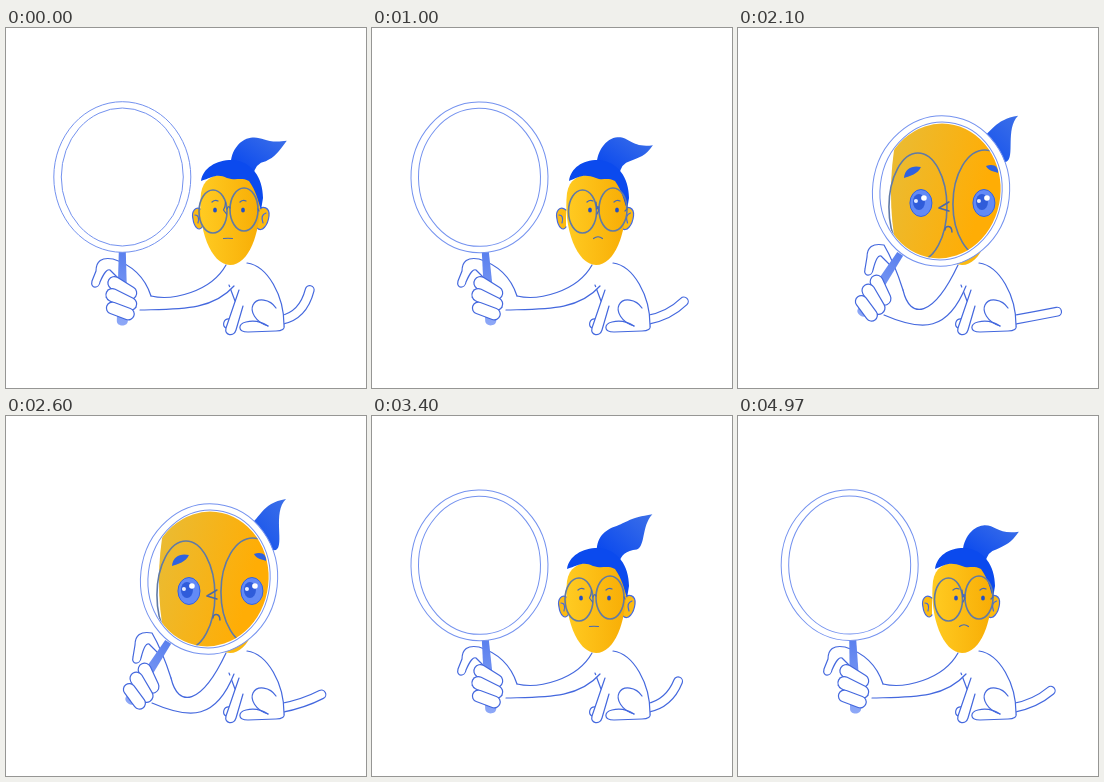
An HTML page that plays this animation: 360 by 360 pixels, repeating every 5 s.

```html
<!DOCTYPE html>
<html lang="en">
<head>
<meta charset="utf-8">
<title>Magnifying glass</title>
<style>
  html, body { margin: 0; width: 100%; height: 100%; overflow: hidden; background: #fff; }
  svg { display: block; width: 100vw; height: 100vh; }
  .ink { fill: none; stroke: #4468de; stroke-width: 1.2; stroke-linecap: round; stroke-linejoin: round; }
  .white { fill: #fff; }
  .ring { stroke: #7492ef; stroke-width: 1; }
  .specs { fill: none; stroke: #617aa5; stroke-width: 1.6; }
  .edge { stroke: #4468de; fill: none; stroke-linecap: round; }
  .core { stroke: #fff; fill: none; stroke-linecap: round; }
</style>
</head>
<body>
<svg viewBox="0 0 360 360">
  <defs>
    <linearGradient id="skin"><stop offset="0" stop-color="#ffcb22"/><stop offset="1" stop-color="#f8ad05"/></linearGradient>
    <linearGradient id="zoomSkin" x2=".9" y2=".5"><stop offset=".1" stop-color="#e8bd38"/><stop offset=".8" stop-color="#ffad05"/></linearGradient>
    <linearGradient id="hair" x1="0" y1="1" x2="1" y2="0"><stop offset=".15" stop-color="#0a49ee"/><stop offset="1" stop-color="#3d70e8"/></linearGradient>
    <linearGradient id="grip" x1="0" y1="0" x2="0" y2="1"><stop offset="0" stop-color="#5a80ee"/><stop offset="1" stop-color="#8ea8f7"/></linearGradient>
    <clipPath id="pane"><ellipse cx="-.5" rx="60" ry="67.5"/></clipPath>
    <g id="bigEye">
      <ellipse rx="11" ry="13.5" fill="#628af6" stroke="#3463df"/>
      <ellipse cx="-2" cy="-1" rx="6" ry="8" fill="#2f5cda"/>
      <circle cx="3" cy="-5" r="2.8" fill="#fff"/>
      <circle cx="-5" cy="-2" r="2" fill="#e6edff"/>
    </g>
  </defs>

  <path class="edge tail" stroke-width="10"/>
  <path class="core tail" stroke-width="7.6"/>

  <path class="white" d="M219 236L222 262 236 300 277 302C281 290 276 262 262 246 254 237 247 236 240 235Z"/>
  <g class="ink">
    <path d="M241 235C262 238 278 268 278 297 279 301 276 303 270 303L242 304C231 304 232 296 240 294 248 292 256 294 262 298"/>
    <path d="M262 298C249 294 244 283 247 277 251 269 264 271 270 280"/>
    <path class="white" d="M224 291C217 290 216 298 220 300"/>
    <path class="white" d="M233 262L220 300C218 308 228 309 230 302L237 278"/>
    <path d="M223 257L229 273"/>
  </g>
  <path id="arm" class="ink" style="fill:#fff"/>

  <path id="pony" fill="url(#hair)"/>
  <g id="earL" class="ink">
    <path fill="#fcbb12" d="M196 182C190 177 185 183 187 191 188 199 193 204 196 199"/>
    <path d="M189 187Q194 187 192 195"/>
  </g>
  <g id="earR" class="ink">
    <path fill="#fcbb12" d="M251 183C257 176 264 180 263 188 262 197 256 205 251 200"/>
    <path d="M260 185Q254 187 257 195"/>
  </g>
  <path fill="url(#skin)" d="M195 165C191 200 205 237 224 237 243 237 254 205 254 175 254 150 240 146 222 146 206 146 197 152 195 165Z"/>
  <path id="cap" fill="#0b4aee"/>
  <ellipse id="lensL" class="specs" cy="183.5" rx="14" ry="21.5"/>
  <ellipse id="lensR" class="specs" cy="181.5" rx="14" ry="21.5"/>
  <ellipse id="eyeL" cy="182" rx="1.9" ry="2.6" fill="#2450c4"/>
  <ellipse id="eyeR" cy="182" rx="1.9" ry="2.6" fill="#2450c4"/>
  <path id="lines" class="ink" style="stroke:#4668b4"/>

  <path id="palm" class="ink" style="fill:#fff"/>
  <path id="handle" fill="url(#grip)" d="M-3.5-38H3.5L5.5 31C5.5 37-5.5 37-5.5 31Z"/>
  <g id="lens">
    <ellipse class="ring white" rx="68.5" ry="75.3"/>
    <g clip-path="url(#pane)">
      <g id="zoom">
        <ellipse cx="20" cy="2" rx="70" ry="145" fill="url(#zoomSkin)"/>
        <ellipse class="specs" cx="-23" cy="16" rx="29" ry="54"/>
        <ellipse class="specs" cx="44" cy="13" rx="32" ry="54"/>
        <path fill="#2f62e0" d="M-37-13C-36-23-28-26-20-24-23-17-31-15-37-13ZM45-25C53-28 58-24 57-18 52-20 48-20 45-25Z"/>
        <use href="#bigEye" x="-20" y="12"/>
        <use href="#bigEye" x="43" y="12"/>
        <path class="ink" style="stroke:#4c68a8;stroke-width:1.5" d="M8 11L-2 17 8 20M4 39C4 34 11 34 11 41"/>
      </g>
    </g>
    <ellipse class="ring" fill="none" rx="61" ry="69"/>
  </g>
  <g id="fingers">
    <path class="edge" stroke-width="14" d="M108 255L124 265"/><path class="core" stroke-width="11.6" d="M108 255L124 265"/>
    <path class="edge" stroke-width="14" d="M106 267L124 276"/><path class="core" stroke-width="11.6" d="M106 267L124 276"/>
    <path class="edge" stroke-width="13" d="M106 280L122 286"/><path class="core" stroke-width="10.6" d="M106 280L122 286"/>
  </g>
</svg>
<script>
const LOOP = 5000, CYCLE = 3900;
const $ = id => document.getElementById(id);
const set = (el, attrs) => { for (const k in attrs) el.setAttribute(k, attrs[k]); };
const mix = (a, b, p) => a + (b - a) * p;
const between = (a, b, p) => a.map((v, i) => mix(v, b[i], p));
const shift = ([x, y], dx, dy) => [x + dx, y + dy];

// Progress from a to b, clamped; ease runs 0 to 1, hump 0 to 1 and back.
const progress = (t, a, b) => Math.min(1, Math.max(0, (t - a) / (b - a)));
const ease = (t, a, b) => (1 - Math.cos(Math.PI * progress(t, a, b))) / 2;
const hump = (t, a, b) => Math.sin(Math.PI * progress(t, a, b)) ** 2;
const wave = t => Math.cos(t / CYCLE * 2 * Math.PI);

function drawTail(t) {
  const w = wave(t);
  const d = `M275 292Q297 288 ${311.5 - 7.8 * w} ${273 - 11 * w}`;
  document.querySelectorAll('.tail').forEach(el => set(el, { d }));
}

function drawPonytail(t) {
  const lift = (1 - wave(t - 600)) / 2;
  const at = (low, high) => between(low, high, lift);
  const crown = at([246, 109], [240, 112]), tip = at([281, 121], [280, 83]);
  const out = at([258, 109], [254, 104]), dip = at([260, 124], [255, 87]);
  const under = at([274, 132], [266, 96]), belly = at([257, 133], [270, 134]);
  const back = between(crown, out, -.9);
  set($('pony'), {
    d: `M225 141C223 124 ${back} ${crown}C${out} ${dip} ${tip}`
      + `C${under} ${shift(belly, 9, -4)} ${belly}Q249 135 247 148Z`
  });
}

function drawFace(t) {
  const turn = 2 * ease(t, 600, 820) - ease(t, 100, 300) - ease(t, 2700, 3100);
  const at = (left, mid, right) => mix(mid, turn < 0 ? left : right, Math.abs(turn));
  const lensL = at(202.5, 207, 210.5), lensR = at(236, 238, 241);
  const eyeL = at(194, 209, 218), eyeR = at(223, 237, 245);
  const nose = at(214, 219.5, 224), mouth = at(217, 222, 226);
  const flip = at(-4, -2, 3), frown = 3 * Math.max(turn, 0);
  const brow = x => `M${x - 3} 174Q${x} 171.5 ${x + 3} 173`;
  set($('lensL'), { cx: lensL });
  set($('lensR'), { cx: lensR });
  set($('eyeL'), { cx: eyeL });
  set($('eyeR'), { cx: eyeR });
  set($('lines'), {
    d: brow(eyeL) + brow(eyeR)
      + `M${nose} 174Q${nose} 179 ${nose + flip} 182L${nose + 1} 186`
      + `M${mouth - 4.5} 210.5Q${mouth} ${210 - frown} ${mouth + 4.5} 210.5`
      + `M${lensL + 14} 181Q${(lensL + lensR) / 2} 177 ${lensR - 14} 180`
      + `M${lensR + 14} 181L253 183`
  });
  set($('earL'), { transform: `translate(${at(9, 0, -2)})` });
  set($('earR'), { transform: `translate(${at(1, 0, -1.5)})` });
  const x = 195 + 2 * turn;
  set($('cap'), {
    d: `M${x} 153C${x + 2} 140 210 132 226 132 246 133 257 150 257 170L255 182`
      + `C252 172 250 163 243 153 235 149 230 153 ${221 + 3 * turn} 150`
      + `C212 145 206 149 ${x} 153Z`
  });
}

function drawHand(reach, px, py) {
  const at = (rest, over) => between(rest, over, reach);
  const wrist = at([145, 268], [165, 262]), heel = at([134, 282], [146, 287]);
  const knuckle = at([95, 232], [134, 218]), tip = at([90, 256], [131, 244]);
  const k = (dx, dy) => shift(knuckle, dx, dy), f = (dx, dy) => shift(tip, dx, dy);
  set($('palm'), {
    d: `M${wrist}Q${shift(wrist, -9, -28)} ${k(12, -1)}Q${k(-5, -4)} ${k(-5, 11)}`
      + `L${f(-4, -3)}C${f(-6, 5)} ${f(3, 5)} ${f(4, -2)}Q${k(5, 8)} ${k(9, 10)}L${k(18, 19)}`
  });
  set($('fingers'), {
    transform: `translate(${px} ${py + 6 * reach}) rotate(${33 * reach}) translate(-116 -262)`
  });
  // The shoulder is left open so the arm flows into the torso.
  set($('arm'), {
    d: `M${wrist}C${at([166, 273], [172, 292])} ${at([205, 264], [195, 290])} 220 237`
      + `M228 258C${at([206, 283], [210, 303])} ${at([172, 281], [185, 304])} ${heel}`
  });
}

function drawGlass(t) {
  const reach = ease(t, 1080, 1520) - ease(t, 2680, 3180);
  const sway = hump(t, 600, 1200) + hump(t, 3000, 3600);
  const angle = 33 * reach - 6 * sway, drop = 3 * hump(t, 150, 700);
  const px = mix(116.3, 141.5, reach), py = mix(262, 257.8, reach);
  const rad = angle * Math.PI / 180, arm = 113 - drop;
  const cx = px + Math.sin(rad) * arm, cy = py - Math.cos(rad) * arm;
  const tilt = angle * .2;
  set($('handle'), { transform: `translate(${px} ${py}) rotate(${angle}) translate(0 ${drop})` });
  set($('lens'), { transform: `translate(${cx} ${cy}) rotate(${tilt})` });
  // The enlarged face slides against the glass.
  set($('zoom'), { transform: `rotate(${-tilt}) translate(${2.3 * (203 - cx)} ${163 - cy})` });
  drawHand(reach, px, py);
}

const start = performance.now();
function tick() {
  const t = (performance.now() - start) % LOOP % CYCLE;
  drawTail(t);
  drawPonytail(t);
  drawFace(t);
  drawGlass(t);
  requestAnimationFrame(tick);
}
tick();
</script>
</body>
</html>
```
